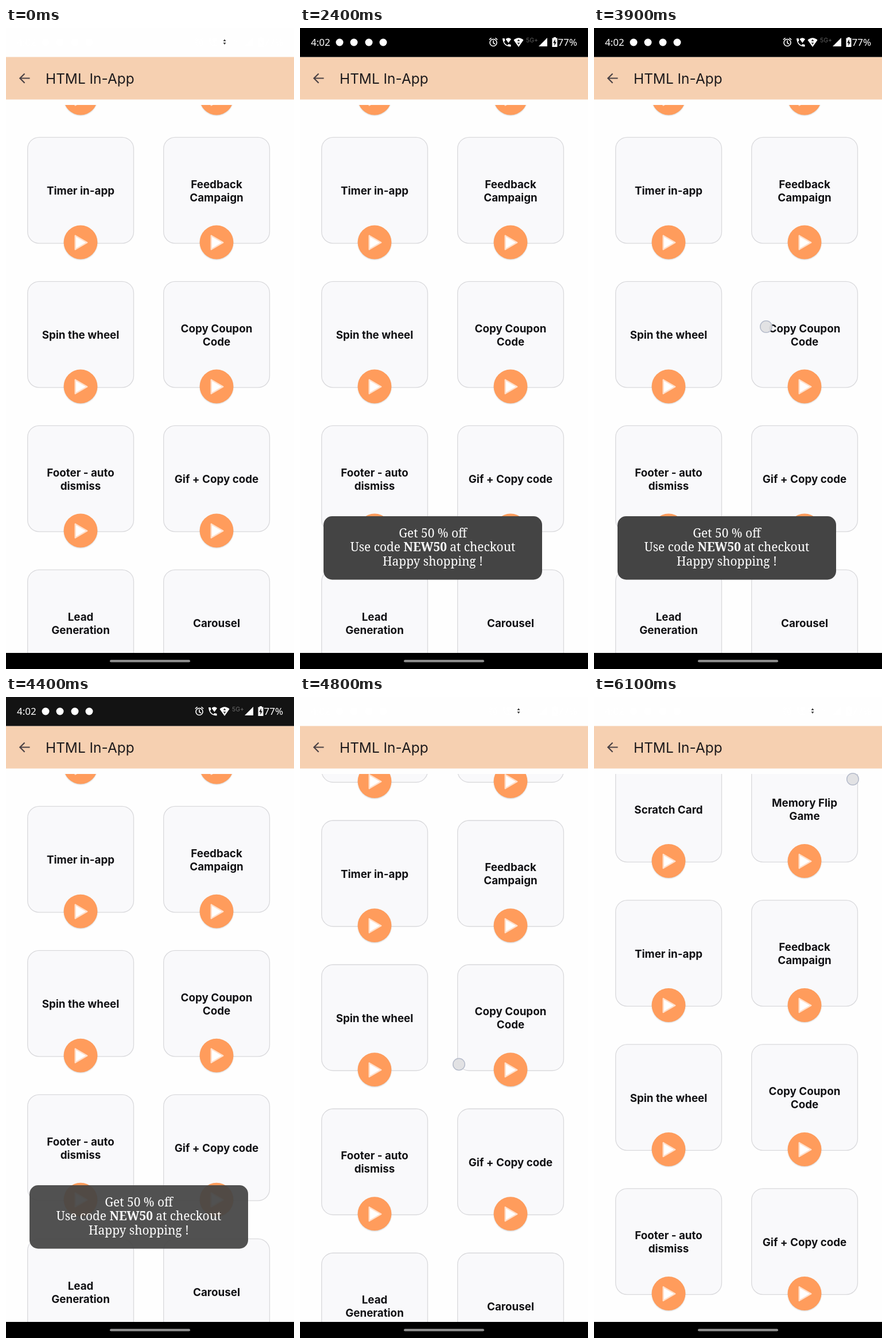
An HTML page that plays this animation: 502x1116 px, repeating every 6.6 s.

```html
<!DOCTYPE html>
<html lang="en">
<head>
<meta charset="utf-8">
<title>HTML In-App</title>
<style>
  html, body { margin: 0; width: 100%; height: 100%; overflow: hidden; background: #fff; }
  svg { display: block; width: 100%; height: 100%; }
  text { font-family: Inter, sans-serif; }
  .label { font-size: 18.8px; font-weight: 700; fill: #111114; text-anchor: middle; }
  .title { font-size: 24.4px; fill: #1d1a1c; }
  .status { font-family: "Noto Sans", sans-serif; font-size: 17px; fill: #fff; }
  .toast { font-family: "Noto Serif", serif; font-size: 20.9px; fill: #fff; text-anchor: middle; }
</style>
</head>
<body>
<svg viewBox="0 0 502 1116" xmlns="http://www.w3.org/2000/svg">
  <defs>
    <clipPath id="view"><rect y="134" width="502" height="954"/></clipPath>
    <filter id="soft" x="-20%" y="-20%" width="140%" height="140%"><feGaussianBlur stdDeviation="1.2"/></filter>
    <g id="card">
      <rect x="-92.3" y=".3" width="184.8" height="184.5" rx="20" fill="#f9f9fb" stroke="#d9d9dc" stroke-width="1.3"/>
      <circle cy="184.2" r="29" fill="#000" opacity=".2" filter="url(#soft)"/>
      <circle cy="183" r="29.4" fill="#ff9c5c"/>
      <path d="M-9.3 171.5V195.5L11.3 183.5Z" fill="#fff" stroke="#ffdfca" stroke-width="2.4" stroke-linejoin="round"/>
    </g>
  </defs>

  <rect width="502" height="1116" fill="#fefefe"/>
  <g clip-path="url(#view)"><g id="list"></g></g>

  <rect y="50.5" width="502" height="74" fill="#f6d0b1"/>
  <path d="M41.5 87.5H24.5M32.5 79.5L24.3 87.5L32.5 95.8" fill="none" stroke="#4b4245" stroke-width="2.2"/>
  <text class="title" x="69" y="97">HTML In-App</text>

  <rect id="bar" width="502" height="50.5" fill="#000"/>
  <g fill="#fff">
    <text class="status" x="19" y="31">4:02</text>
    <circle cx="69" cy="25" r="6.5"/>
    <circle cx="94" cy="25" r="6.5"/>
    <circle cx="120" cy="25" r="6.5"/>
    <circle cx="145" cy="25" r="6.5"/>
    <g fill="none" stroke="#fff" stroke-width="1.6">
      <circle cx="337" cy="25.5" r="6"/>
      <path d="M337 21.5V26L340 28M329.8 20.5L333.5 17.3M344.2 20.5L340.5 17.3"/>
    </g>
    <path d="M353 18H356.5L357.5 22L355.5 24Q357.5 28 361.5 30L363.5 28L367.5 29V32.5Q354 32.5 353 18ZM358.5 19.5Q363 15 368 19.5L363.3 26Z"/>
    <path d="M372.5 21Q381 13.5 389.5 21L381 33Z"/>
    <text x="394" y="25" font-size="10.5" opacity=".38">5G+</text>
    <path d="M431 17V32H416Z"/>
    <path fill-rule="evenodd" d="M442 17.5V16H446V17.5H448.5V33H439.5V17.5ZM444.8 19.5L441.3 26H443.5V31L446.8 24.5H444.8Z"/>
    <text class="status" x="449.5" y="31">77%</text>
  </g>
  <path d="M378.5 23L381 19.5L383.5 23ZM378.5 25.5H383.5L381 29Z" fill="#3c3c3c"/>

  <rect y="1088" width="502" height="28" fill="#000"/>
  <rect x="181" y="1100" width="140" height="4.3" rx="2.15" fill="#8d8d8d"/>

  <g id="toast">
    <rect x="41" y="850" width="381" height="110.5" rx="15" fill="#444"/>
    <text class="toast" x="231.5" y="886.5">Get 50 % off</text>
    <text class="toast" x="231.5" y="911.3">Use code <tspan font-weight="700">NEW50</tspan> at checkout</text>
    <text class="toast" x="231.5" y="936">Happy shopping !</text>
  </g>

  <circle id="dot" r="10.3" fill="#e0e0e2" fill-opacity=".94" stroke="#b6bccb" stroke-width="1.5"/>
</svg>
<script>
const LOOP = 6600, STEP = 100;
const [list, bar, toast, dot] = ['list', 'bar', 'toast', 'dot'].map(id => document.getElementById(id));

const rows = [
  ['Scratch Card', 'Memory Flip|Game'],
  ['Timer in-app', 'Feedback|Campaign'],
  ['Spin the wheel', 'Copy Coupon|Code'],
  ['Footer - auto|dismiss', 'Gif + Copy code'],
  ['Lead|Generation', 'Carousel']
];

function card(label, x, y) {
  const lines = label.split('|');
  const top = 100 - 11.5 * (lines.length - 1);
  const text = lines.map((s, i) => `<text class="label" y="${top + i * 23}">${s}</text>`).join('');
  return `<g transform="translate(${x} ${y})"><use href="#card"/>${text}</g>`;
}
list.innerHTML = rows.map((row, r) =>
  row.map((label, c) => card(label, 130 + 237 * c, 251 * r - 61)).join('')).join('');

// Smoothstep from 0 at time a to 1 at time b.
function ramp(t, a, b) {
  const p = Math.min(1, Math.max(0, (t - a) / (b - a)));
  return p * p * (3 - 2 * p);
}

// The list follows the drag and settles along an S-curve.
const scroll = t => 163.5 / (1 + Math.exp((4907 - t) / 62));

// Finger sweeps down over the list, then back up.
function sweep(t) {
  const u = ((t - 3300) / 600) ** 2;
  return [340 - 40 * u, 757 - 237 * u];
}

const touches = [
  { from: 100, to: 600, at: () => [130, 876] },
  { from: 2800, to: 4000, at: sweep },
  { from: 4600, to: 5300, at: t => [277, 618 + 0.87 * scroll(t)] },
  { from: 6100, to: LOOP, at: () => [451, 143] }
];

function draw(t) {
  const leave = 1 - ramp(t, 4360, 4600);
  bar.setAttribute('opacity', ramp(t, 900, 1100) * leave);
  toast.setAttribute('opacity', ramp(t, 1200, 1400) * leave);
  list.setAttribute('transform', `translate(0 ${scroll(t)})`);

  const touch = touches.find(({ from, to }) => t >= from && t < to);
  dot.setAttribute('visibility', touch ? 'visible' : 'hidden');
  if (touch) dot.setAttribute('transform', `translate(${touch.at(t).join(' ')})`);
}

const start = performance.now();
function tick() {
  const t = (performance.now() - start) % LOOP;
  draw(Math.floor(t / STEP) * STEP);
  requestAnimationFrame(tick);
}
tick();
</script>
</body>
</html>
```
